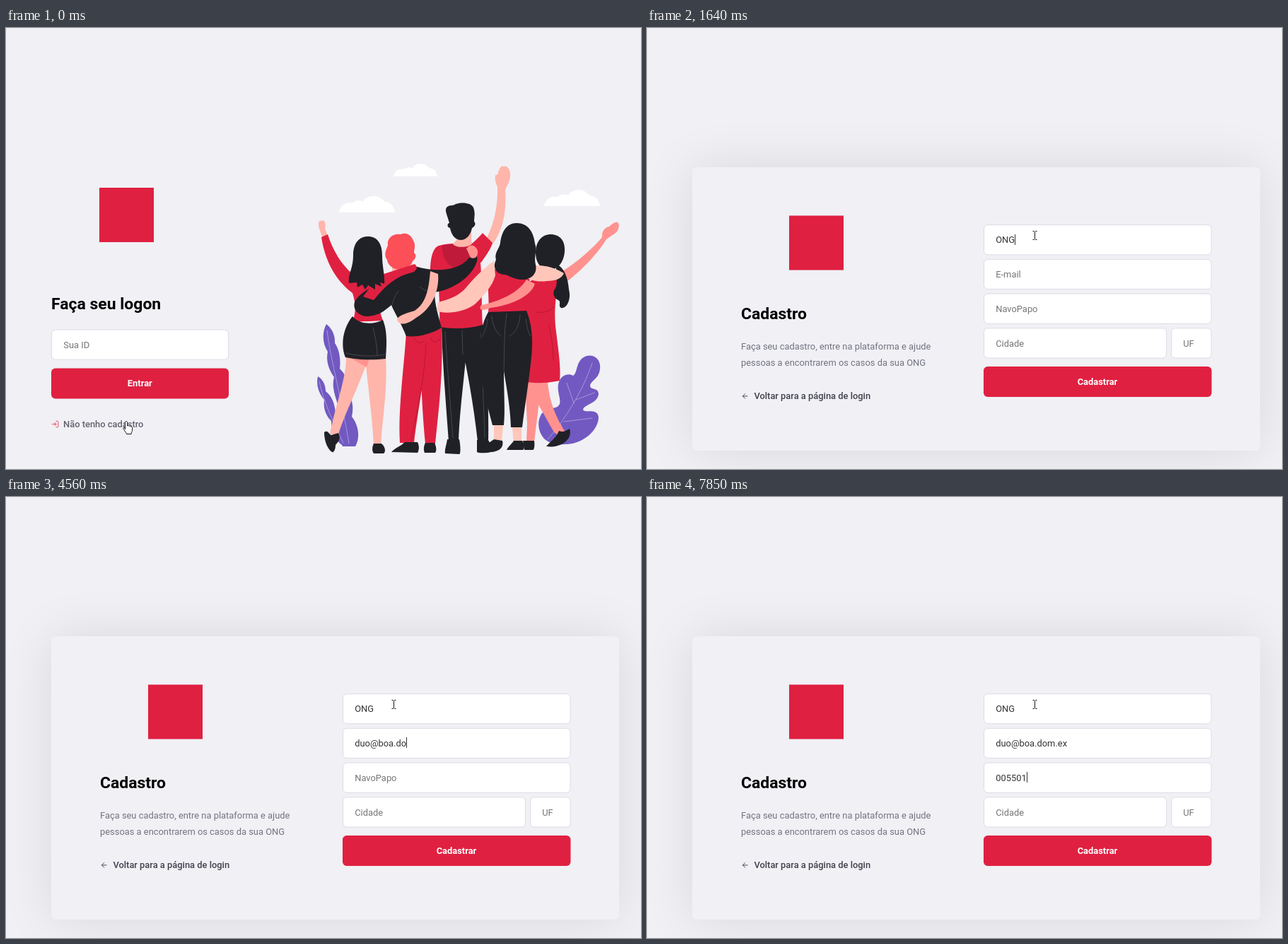
Recreate the animation shown at these times as an HTML page. Size 898 px wide and 624 px high, loop 8000 ms.

```html
<!DOCTYPE html>
<html lang="pt-BR">
<head>
<meta charset="utf-8">
<title>Cadastro</title>
<style>
  html, body { margin: 0; width: 100%; height: 100%; overflow: hidden; background: #f0f0f5; }
  #card { position: absolute; left: 64px; top: 197px; width: 803px; height: 401px; border-radius: 5.7px; background: #f0f0f5; box-shadow: 0 0 72px rgba(0, 0, 0, .1); }
  svg { position: absolute; left: 0; top: 0; }
  text { font: 400 12.9px Roboto, sans-serif; white-space: pre; }
  .title { font-size: 22.94px; font-weight: 700; }
  .btn { font-weight: 700; fill: #fff; text-anchor: middle; }
  .link { font-weight: 500; fill: #41414d; }
  .para { fill: #737380; }
  .hint { fill: #757575; }
  .value { fill: #333; }
  .box { fill: #fff; stroke: #dcdce6; stroke-width: 1; }
  .icon { fill: none; stroke-width: 2; stroke-linecap: round; stroke-linejoin: round; }
  .k { fill: #202126; }
  .r { fill: #e02041; }
  .d { fill: #c01a3a; }
  .p { fill: #ffb5aa; }
  .l { fill: #ffc6b9; }
  .c { fill: #ff928e; }
  .h { fill: #fc4f57; }
  .v { fill: #7159c1; }
  .w { fill: #fff; }
  .vein, .seam, .fold { fill: none; stroke-linecap: round; }
  .vein { stroke: #a797dc; }
  .seam { stroke: #46474e; }
  .fold { stroke: #b81836; }
  .cursor { fill: #fff; stroke: #16161c; stroke-linejoin: round; }
</style>
</head>
<body>
<div id="card"></div>
<svg width="898" height="624" viewBox="0 0 898 624">
  <defs>
    <path id="cloud" d="M0 24C2 14 10 9 19 11C24 6 30 7 34 9C38 0 56-3 64 9C72 9 78 15 79 24Z"/>
  </defs>

  <g id="login">
    <rect class="r" x="132" y="226" width="77" height="77"/>
    <text class="title" x="64" y="398">Faça seu logon</text>
    <rect class="box" x="64.5" y="427" width="250" height="42.2" rx="5.3"/>
    <text class="hint" x="81.3" y="452.6">Sua ID</text>
    <rect class="r" x="64" y="481.5" width="251" height="43" rx="5.7"/>
    <text class="btn" x="189.3" y="507.4">Entrar</text>
    <g opacity=".8">
      <path class="icon" stroke="#e02041" transform="translate(63.8 554.8) scale(.478)" d="M15 3h4a2 2 0 0 1 2 2v14a2 2 0 0 1-2 2h-4M10 17l5-5-5-5M15 12H3"/>
      <text class="link" x="81" y="565.2">Não tenho cadastro</text>
    </g>

    <!-- clouds and plants -->
    <use href="#cloud" class="w" transform="translate(471 236.7)"/>
    <use href="#cloud" class="w" transform="translate(761 228)"/>
    <use href="#cloud" class="w" transform="translate(548 191.2) scale(.785)"/>
    <path class="v" d="M453 419C447 430 447 446 455 458C452 472 457 484 464 494C460 508 466 522 470 535C466 555 470 580 476 592L494 592C501 580 499 562 489 550C492 536 490 524 482 514C485 500 480 490 472 482C474 466 470 452 465 446C466 434 460 424 453 419Z"/>
    <path class="v" d="M441 493C438 506 443 518 450 526C448 540 454 550 460 556C460 572 468 588 478 591L484 575C480 560 474 552 466 545C465 530 460 520 452 514C452 504 447 496 441 493Z"/>
    <path class="vein" d="M454 428C459 470 476 530 485 588M443 500C449 530 464 560 477 587"/>
    <path class="v" d="M762 582C750 570 750 548 764 540C772 536 779 540 783 532C785 524 779 515 781 504C784 490 796 488 802 492C808 488 806 476 814 468C826 458 842 466 840 482C839 496 828 498 826 506C826 513 838 508 838 518C836 532 818 532 816 540C818 546 838 536 838 552C836 574 810 590 790 589C778 590 768 587 762 582Z"/>
    <path class="vein" d="M766 582C790 555 815 515 829 474M803 531L793 502M806 526L832 516M785 561L767 551M789 557L829 552"/>

    <!-- woman on the right -->
    <path class="c" d="M734 498L737 560L736 585L747 585L752 545L757 500Z"/>
    <path class="c" d="M736 500C745 520 760 545 775 572L786 580L790 570C780 555 768 530 766 500Z"/>
    <path class="k" d="M764 592C770 585 778 580 782 570C788 573 793 569 797 567C800 576 795 583 789 587C780 593 770 593 764 592ZM731 584L747 584C748 590 747 597 745 597L733 597Z"/>
    <path class="c" d="M772 352C790 345 825 318 843 296C842 286 848 282 853 281C858 276 864 273 866 276C868 282 866 289 856 294L849 299C833 325 806 350 784 366Z"/>
    <path class="r" d="M736 362C750 350 770 350 780 358C778 385 774 400 778 430C781 455 785 480 783 499C765 503 745 503 729 500C727 470 730 420 736 362Z"/>
    <path class="fold" d="M750 402C762 404 770 400 775 394M768 420C772 442 774 455 774 470"/>
    <path class="k" d="M770 292C785 292 791 303 790 316C789 332 780 342 769 342C757 342 749 333 749 318C749 303 757 292 770 292ZM780 335C790 340 795 355 796 370C800 385 792 398 785 396C780 393 786 388 781 385C774 382 772 374 777 368C782 358 774 345 780 335Z"/>

    <!-- tall man -->
    <path class="p" d="M678 300C690 280 696 250 695 225C690 214 691 205 695 208C697 200 700 194 704 196C708 194 714 200 713 210C712 220 707 224 706 230C708 255 704 285 688 306L678 312Z"/>
    <path class="k" d="M616 420L674 418C676 430 676 445 674 460L650 470C646 510 641 550 640 585L626 585C622 530 617 470 616 420ZM640 440L676 423C680 480 683 540 682 585L667 585C662 540 655 500 648 465ZM624 582L641 582C643 592 643 603 641 603L621 602C620 596 623 590 624 582ZM666 583L682 583L690 598C686 602 668 602 666 600Z"/>
    <path class="seam" d="M645 428L646 462M621 430C624 480 629 540 632 580M671 432C673 480 676 540 677 580"/>
    <path class="r" d="M612 308C628 304 655 303 668 310C674 335 672 390 674 420C655 426 632 426 613 423C614 395 612 370 611 348L600 345C600 330 602 312 612 308Z"/>
    <path class="r" d="M650 312C662 303 670 295 674 290L688 304C685 315 676 325 672 332Z"/>
    <path class="d" d="M616 308C618 335 632 345 660 343L666 318C655 306 632 304 616 308Z"/>
    <path class="p" d="M637 288L658 288L658 302C665 308 640 314 632 306L637 300Z"/>
    <path class="k" d="M627 276C624 265 620 258 623 254C628 249 630 253 636 249C644 246 658 247 661 254C664 262 662 268 662 274C666 278 661 282 659 283C657 294 650 300 643 300C634 300 629 290 628 283C623 282 624 276 627 276Z"/>

    <!-- woman on the left -->
    <path class="p" d="M448 298L443 284C441 276 442 272 446 273C450 270 453 276 451 284L455 294ZM481 464C482 490 468 530 462 556L458 574L470 576C476 552 500 505 512 469ZM508 467L537 466C540 510 532 555 530 590L520 590C518 550 512 510 508 467Z"/>
    <path class="c" d="M484 465L514 467L510 480Z"/>
    <path class="r" d="M446 296L455 292C462 315 475 335 489 347C492 352 530 352 540 348L550 346L528 372C526 390 528 400 533 414L490 416C496 400 494 388 490 375C470 360 452 335 446 296Z"/>
    <path class="k" d="M490 408C500 420 520 420 533 413C540 430 538 450 537 468C520 470 498 470 480 466C473 450 476 425 490 408ZM450 572C455 568 456 574 460 576L470 573C474 580 470 586 466 590C466 596 464 601 461 600C455 596 450 585 450 572ZM520 588L531 588C537 593 537 600 534 602L520 602C517 598 518 592 520 588Z"/>
    <path class="seam" d="M481 460C500 465 520 465 536 462M519 424C523 440 525 452 525 463"/>

    <!-- red-haired friend -->
    <path class="r" d="M566 430L600 428L594 460C591 500 581 550 577 587L557 587C554 540 563 480 566 430ZM588 430L616 422C619 480 612 540 607 588L593 588C588 540 588 500 584 460Z"/>
    <path class="fold" d="M577 438C580 446 586 448 592 442M601 438C602 446 608 446 614 440M594 446C592 500 580 545 573 584"/>
    <path class="k" d="M545 600C550 594 558 592 564 586L582 586C585 592 584 598 582 601ZM593 587L606 587C609 593 609 599 607 601L592 601C590 596 591 591 593 587Z"/>
    <path class="p" d="M546 330L574 328L576 342L546 350Z"/>
    <path class="k" d="M540 352C550 340 570 336 582 338C605 345 640 345 655 325C664 318 668 322 666 330C660 350 635 370 606 374C606 390 612 410 616 424C600 434 580 438 566 436C560 420 548 400 545 392C535 400 530 406 512 408C498 408 490 398 493 388C500 372 530 362 540 352Z"/>
    <path class="seam" d="M546 392C548 384 550 378 555 372M606 374C596 374 590 370 585 366"/>
    <path class="c" d="M651 312C657 305 664 307 667 315C668 322 664 328 657 325Z"/>
    <path class="h" d="M540 308C538 297 548 290 558 292C566 288 574 294 576 301C580 306 577 314 577 318C582 322 578 328 575 330C572 337 566 342 558 342C548 342 540 336 539 328C534 322 537 314 540 308Z"/>
    <path class="r" d="M528 350L578 334C583 338 581 344 574 346C555 350 538 362 520 385L505 380Z"/>
    <path class="k" d="M512 295C525 295 532 305 532 322C532 338 536 350 535 362L529 360L531 366L522 362L522 370L512 364L508 370L504 363L497 367L496 360L485 361C483 350 491 340 491 322C491 305 499 295 512 295Z"/>
    <path class="p" d="M600 344L611 348C613 370 604 396 580 410C570 418 558 422 554 415C550 408 565 404 578 400C596 388 598 365 600 344Z"/>

    <!-- long-haired woman -->
    <path class="k" d="M682 402C700 396 725 396 736 400C746 425 745 450 742 475C738 510 733 540 730 565L714 565C713 535 708 510 704 485C704 515 706 540 704 562L688 562C680 530 664 480 670 445C672 425 676 412 682 402Z"/>
    <path class="seam" d="M681 412C680 425 676 432 672 438M708 404C704 430 705 460 704 484M735 412C737 425 739 432 742 436M687 408C688 422 694 432 700 436M727 406C726 422 720 432 712 436"/>
    <path class="l" d="M690 562H703L701 586H690ZM716 565H729V588H718Z"/>
    <path class="k" d="M666 599C674 592 682 588 690 582L702 584C704 592 700 598 688 600ZM708 597C710 592 716 588 718 584L730 584C734 590 733 596 731 597Z"/>
    <path class="r" d="M690 342C705 335 735 340 742 350C738 370 734 385 737 400L682 402C684 385 680 365 683 350Z"/>
    <path class="l" d="M738 338C755 332 778 340 789 347C786 354 778 358 765 358C750 360 738 356 735 352ZM690 330C680 336 665 350 650 368C638 382 618 386 611 388L609 400C620 406 650 402 664 390C676 378 688 365 692 350Z"/>
    <path class="c" d="M736 356L748 362C742 380 715 392 685 396C672 402 668 398 672 392C695 388 725 375 736 356Z"/>
    <path class="k" d="M722 276C738 276 746 288 748 305C752 315 746 322 749 335C752 348 742 356 731 356C720 357 712 350 705 349C692 348 688 338 693 328C690 318 698 312 699 304C701 288 708 276 722 276Z"/>
  </g>

  <g id="signup">
    <rect class="r" x="201" y="265.5" width="77" height="77"/>
    <text class="title" x="133" y="412">Cadastro</text>
    <text class="para" x="133" y="455">Faça seu cadastro, entre na plataforma e ajude</text>
    <text class="para" x="133" y="477.6">pessoas a encontrarem os casos da sua ONG</text>
    <path class="icon" stroke="#41414d" transform="translate(133 515.2) scale(.478)" d="M19 12H5M12 19l-7-7 7-7"/>
    <text class="link" x="151.4" y="525.2">Voltar para a página de login</text>
    <g id="fields"></g>
    <rect class="r" x="476" y="479" width="322.5" height="43" rx="5.7"/>
    <text class="btn" x="637" y="504.7">Cadastrar</text>
    <rect id="caret" width="1" height="15" fill="#333"/>
  </g>

  <g id="cursor" class="cursor">
    <path id="hand" transform="translate(-5 0)" d="M3.5 12V2C3.5 0 6.5 0 6.5 2V7C7 6 9 6 9.3 7.5C10 6.6 11.6 7 11.8 8.3C12.6 7.6 13.6 8.2 13.6 9.5V13C13.6 15.5 12 16 12 18.5H5.5C5 16 1.5 13 .8 10.5C.6 9 2.3 8.8 3.5 11Z"/>
    <path id="arrow" d="M0 0V15L3.6 11.8L6 17.2L8.4 16.2L6 11H10.8Z"/>
    <path id="beam" style="fill:none" d="M-3-6H-1L0-5L1-6H3M0-5V5M-3 6H-1L0 5L1 6H3"/>
  </g>
</svg>
<script>
  const LOOP = 8000;
  const $ = id => document.getElementById(id);
  const show = (el, on) => { el.style.display = on ? '' : 'none'; };

  function add(tag, attrs, text = '') {
    const el = document.createElementNS('http://www.w3.org/2000/svg', tag);
    for (const key in attrs) el.setAttribute(key, attrs[key]);
    el.textContent = text;
    return $('fields').appendChild(el);
  }

  function addField(x, row, w, hint) {
    const y = 278.3 + row * 48.75;
    add('rect', { class: 'box', x: x + .5, y: y + .3, width: w - 1, height: 42.2, rx: 5.3 });
    return { x: x + 17.2, y, hint, text: add('text', { class: 'hint', x: x + 17.2, y: y + 26.1 }, hint) };
  }

  // focus: when the caret arrives; keys: when each character is typed
  const fields = [
    { ...addField(476, 0, 322.5, 'Nome da ONG'), focus: 1160, value: 'ONG', keys: [1160, 1360, 1640] },
    { ...addField(476, 1, 322.5, 'E-mail'), focus: 2340, value: 'duo@boa.dom.ex',
      keys: [2850, 2930, 2980, 3390, 3670, 3820, 3870, 4230, 4340, 4460, 4570, 4690, 4920, 5020] },
    { ...addField(476, 2, 322.5, 'NavoPapo'), focus: 5380, value: '005501', keys: [6320, 6450, 7160, 7390, 7440, 7850] }
  ];
  addField(476, 3, 259, 'Cidade');
  addField(741, 3, 57.5, 'UF');

  const blinks = [[2190, 2340], [5890, 6320], [6960, 7160]];

  function drawFields(t) {
    let active = null;
    for (const f of fields) {
      f.count = f.keys.filter(k => k <= t).length;
      const text = f.count ? f.value.slice(0, f.count) : f.hint;
      if (f.text.textContent !== text) f.text.textContent = text;
      f.text.setAttribute('class', f.count ? 'value' : 'hint');
      if (t >= f.focus) active = f;
    }
    const lit = active && !blinks.some(([from, to]) => t >= from && t < to);
    show($('caret'), lit);
    if (!lit) return;
    const width = active.count ? active.text.getComputedTextLength() : 0;
    $('caret').setAttribute('x', Math.round(active.x + width));
    $('caret').setAttribute('y', Math.round(active.y + 13.2));
  }

  function drawCursor(t) {
    // ten hops between 610 and 1030 ms
    const hop = t < 610 ? 0 : Math.min(10, 1 + Math.floor((t - 610) / (420 / 9) + 1e-6));
    const k = hop / 10, ease = k * k * (3 - 2 * k);
    const x = 170 + 378.5 * ease, y = 556 - 262.5 * ease;
    const onLink = x < 316 && y > 512 && y < 530;
    const kind = hop === 0 || onLink ? 'hand' : x > 476 ? 'beam' : 'arrow';
    for (const id of ['hand', 'arrow', 'beam']) show($(id), id === kind);
    $('cursor').setAttribute('transform', `translate(${x} ${y})`);
  }

  const start = performance.now();
  function draw() {
    const t = (performance.now() - start) % LOOP;
    const signedUp = t >= 240;
    show($('login'), !signedUp);
    show($('signup'), signedUp);
    show($('card'), signedUp);
    drawFields(t);
    drawCursor(t);
    requestAnimationFrame(draw);
  }
  draw();
</script>
</body>
</html>
```
